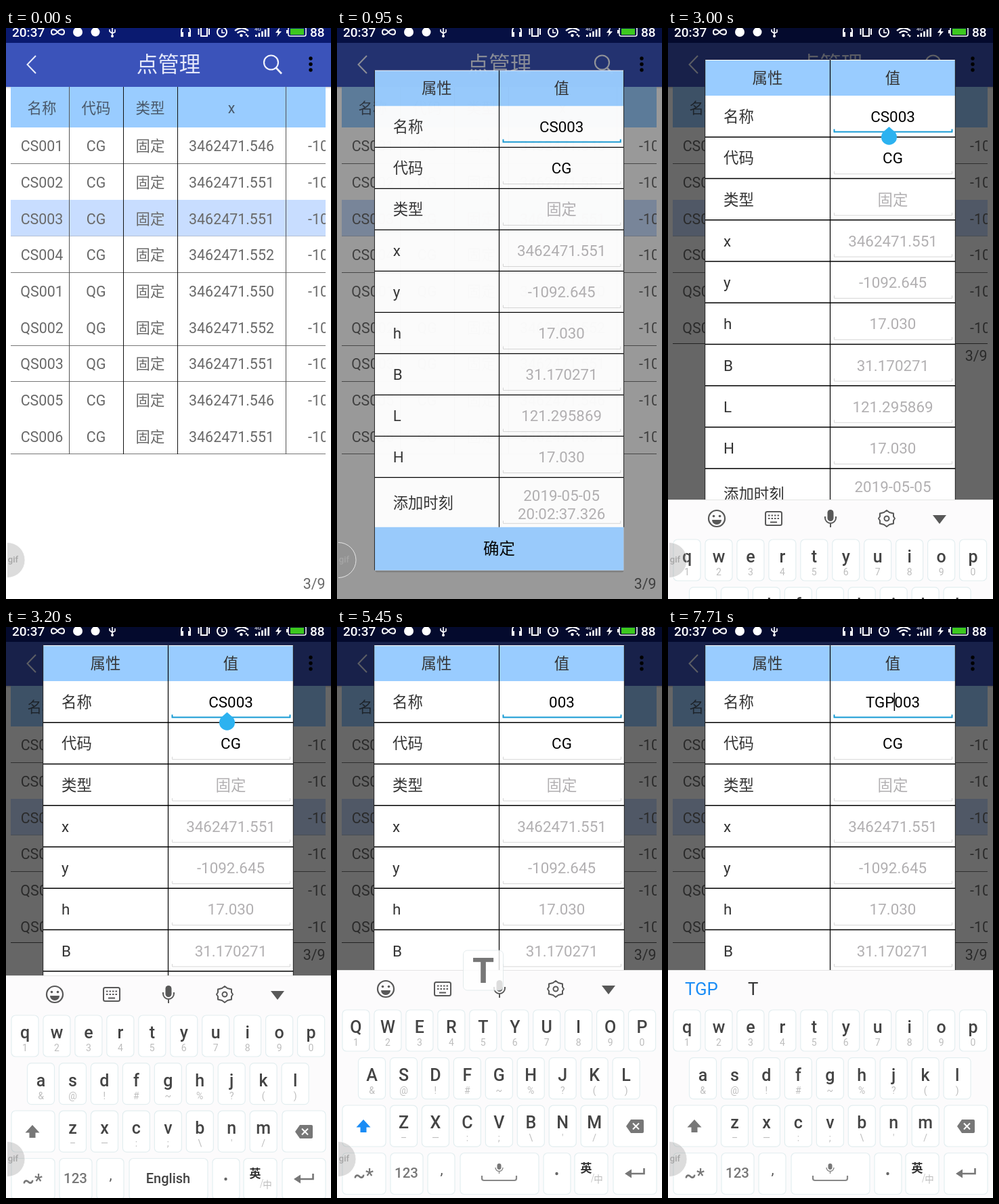
Recreate the animation shown at these times as an HTML page. Size 480 by 844 pixels, loop 8 s.

```html
<!DOCTYPE html>
<html lang="zh">
<head>
<meta charset="utf-8">
<title>点管理</title>
<style>
html, body { margin: 0; width: 100%; height: 100%; overflow: hidden; background: #fff; }
svg { display: block; width: 100%; height: 100%; }
text { font-family: Roboto, "Noto Sans CJK SC", "Noto Sans CJK", sans-serif; white-space: pre; }
</style>
</head>
<body>
<svg id="stage" viewBox="0 0 480 844"></svg>
<script>
const LOOP = 8000;
const BLUE = '#99ccff';
const stage = document.getElementById('stage');
const $ = id => document.getElementById(id);

// y is the optical middle of a line of capitals
const text = (s, x, y, size, fill, more = '') =>
  `<text x="${x}" y="${y + size * 0.36}" font-size="${size}" fill="${fill}" text-anchor="middle" ${more}>${s}</text>`;
const rect = (x, y, w, h, fill, more = '') =>
  `<rect x="${x}" y="${y}" width="${w}" height="${h}" fill="${fill}" ${more}/>`;
const path = (d, stroke, width, more = '') =>
  `<path d="${d}" fill="none" stroke="${stroke}" stroke-width="${width}" ${more}/>`;
const shape = (d, fill) => `<path d="${d}" fill="${fill}"/>`;
const dot = (x, y, r, fill) => `<circle cx="${x}" cy="${y}" r="${r}" fill="${fill}"/>`;
const ring = (x, y, r, stroke, width) =>
  `<circle cx="${x}" cy="${y}" r="${r}" fill="none" stroke="${stroke}" stroke-width="${width}"/>`;
const START = 'style="text-anchor:start"';

function appBar() {
  return rect(0, 0, 480, 22, '#0a1a70') +
    rect(0, 87, 480, 2, '#000', 'opacity=".12"') +
    rect(0, 22, 480, 65, '#3b53ba') +
    path('M44 41L31.5 54L44 67', '#e8ebfa', 2) +
    text('点管理', 240, 54, 31.5, '#e4e8fa') +
    ring(391.5, 51, 10.5, '#f0f2fc', 2.2) + path('M399 59L407 67.5', '#f0f2fc', 2.6) +
    [45, 53.5, 62].map(y => dot(450, y, 2.7, '#000')).join('');
}

function table() {
  const size = 21.4, grey = '#696969';
  const cols = [53, 133, 213, 333];
  const names = ['CS001', 'CS002', 'CS003', 'CS004', 'QS001', 'QS002', 'QS003', 'CS005', 'CS006'];
  const tails = ['546', '551', '551', '552', '550', '552', '551', '546', '551'];
  let out = rect(7, 87, 465, 60, BLUE) + rect(7, 254, 465, 54, '#c8ddff');
  ['名称', '代码', '类型', 'x'].forEach((s, i) => out += text(s, cols[i], 118, size, '#49586a'));
  names.forEach((name, i) => {
    const y = 174.5 + i * 53.67;
    [name, name[0] + 'G', '固定', '3462471.' + tails[i]]
      .forEach((s, c) => out += text(s, cols[c], y, size, grey));
    out += text('-1092.645', 446, y, size, grey, START);
  });
  [200.5, 361.5, 469.5, 522.5, 629.5].forEach(y => out += path(`M7 ${y}H472`, '#777', 1));
  out += path('M7 307.5H472', '#b4c0d4', 1);
  [93.5, 173.5, 253.5, 413.5].forEach((x, i) =>
    out += path(`M${x} 87V630`, i % 3 ? '#111' : '#555', 1));
  return out;
}

function dialog() {
  const rows = [['名称', ''], ['代码', 'CG'], ['类型', '固定'], ['x', '3462471.551'], ['y', '-1092.645'],
    ['h', '17.030'], ['B', '31.170271'], ['L', '121.295869'], ['H', '17.030']];
  const size = 22.4, grey = '#b2b0b2';
  const under = (y, color, w) => path(`M245.5 ${y - 4}V${y}H419.5V${y - 4}`, color, w);
  let out = rect(56, 64, 368, 742, '#000', 'opacity=".16" rx="2"') +
    rect(55, 61, 369, 742, '#fff') + rect(55, 62, 369, 52, BLUE) + rect(55, 739, 369, 64, BLUE) +
    text('属性', 147, 88, size, '#333') + text('值', 332, 88, size, '#333');
  rows.forEach(([label, value], i) => {
    const y = 145 + i * 61.25;
    out += text(label, 82, y, size, '#333', START) +
      text(value, 332, y, size, i < 2 ? '#000' : grey, i ? '' : 'id="name"') +
      (i ? under(y + 23.5, '#d6d6d6', 1) : under(167.5, '#169ad4', 2)) +
      path(`M55 ${y + 30.3}H424`, '#000', 1.4);
  });
  out += text('添加时刻', 82, 703, size, '#333', START) +
    text('2019-05-05', 332, 692, size, grey) + text('20:02:37.326', 332, 719, size, grey) +
    under(733.5, '#d6d6d6', 1) + path('M239.5 61V739', '#000', 1.2) +
    path('M54.7 61V803M424.3 61V739', '#222', 1) + text('确定', 239.5, 771, 23.5, '#000') +
    rect(0, 131, 1.5, 27, '#000', 'id="caret"') +
    '<path id="handle" d="M326.500 160L334.500 167A11.500 11.500 0 1 1 318.500 167Z" fill="#2cb2f0"/>';
  return out;
}

function toolbar() {
  const c = '#585858';
  let out = ring(72, 535, 12, c, 2.2) + dot(67.5, 531.5, 1.8, c) + dot(76.5, 531.5, 1.8, c) +
    shape('M65 537H79A7 7 0 0 1 65 537Z', c) +
    `<rect x="144" y="525" width="24" height="20" rx="2.500" fill="none" stroke="${c}" stroke-width="2"/>` +
    path('M148 530.5H165M148 535H165', c, 2, 'stroke-dasharray="2.500 2"') + path('M151 540.5H161', c, 2) +
    rect(235.5, 522, 9, 17, c, 'rx="4.500"') + path('M232 532V534A8 8 0 0 0 248 534V532M240 542V548', c, 2) +
    path('M323 523L327 526L333 527.500V532L335 535L333 538V542.500L327 544L323 547L319 544L313 542.500V538L311 535L313 532V527.500L319 526Z', c, 2, 'stroke-linejoin="round"') +
    ring(323, 535, 3.5, c, 2) + shape('M391 530H411L401 543Z', c);
  return `<g id="tools">${out}</g>`;
}

function keyboard() {
  const key = (x, y, w, id = '') =>
    rect(x, y, w, 61, '#fff', `rx="6" stroke="#e3eef0" stroke-width="1.200" ${id && `id="${id}"`}`);
  const rows = [['qwertyuiop', '1234567890', 28], ['asdfghjkl', '&@!#~%?()', 51.5], ['zxcvbnm', "–—:;\\'/", 98.5]];
  let out = rect(0, 507, 480, 345, '#fcfbfc') + path('M0 507.5H480', '#e4e4e4', 1) + toolbar() + '<g id="words"></g>';
  rows.forEach(([letters, subs, x0], r) => [...letters].forEach((ch, i) => {
    const x = x0 + i * 46.95, y = 566 + r * 70.6;
    out += key(x - 20, y, 40) + text(ch, x, y + 25, 25, '#444', 'class="letter" font-weight="500"') +
      text(subs[i].replace('&', '&amp;'), x, y + 48, 14, '#bdbdbd');
  }));
  out += key(8, 707, 64, 'shiftKey') + '<path id="shift" d="M39 728L49.500 739.500H43.500V747H34.500V739.500H28.500Z"/>' +
    key(408, 707, 64, 'backKey') +
    shape('M434 728H451Q453 728 453 730V746Q453 748 451 748H434L427 738Z', '#777') +
    path('M437 733.500L446 742.500M446 733.500L437 742.500', '#fff', 2);
  [[8, 64], [79, 48], [134, 40], [182, 116], [305, 40], [351, 49], [408, 64]].forEach(([x, w]) => out += key(x, 777.5, w));
  out += text('~*', 39, 810, 27, '#777', 'font-weight="500"') + text('123', 102.5, 807, 20.5, '#777', 'font-weight="500"') +
    text(',', 154.5, 801, 21, '#555') + dot(324.5, 808, 2.2, '#666') +
    text('英', 368, 800, 17, '#333', 'font-weight="700"') + path('M379.5 808L375.5 821', '#ccc', 1) + text('中', 386, 816, 13.5, '#bbb') +
    path('M453.5 800V808H431', '#777', 2.6) + shape('M425 808L435 801.5V814.5Z', '#777') +
    `<g id="english">${text('English', 239.5, 807, 20, '#444', 'font-weight="500"')}</g><g id="voice">` +
    rect(236.500, 793, 6, 9, '#777', 'rx="3"') + path('M234 799A5.500 5.500 0 0 0 245 799M239.5 804.5V808', '#888', 1.4) +
    path('M214 811V815Q214 818 217 818H262Q265 818 265 815V811', '#888', 2.2) + '</g>';
  return out;
}

function statusBar() {
  const w = '#fff';
  let out = text('20:37', 9, 6.2, 19, w, START + ' font-weight="500"') + text('88', 449, 6.2, 19, w, START + ' font-weight="500"') +
    path('M76 6C72 1 67 1 67 6S72 11 76 6S86 1 86 6S80 11 76 6', w, 2) +
    dot(106, 6, 7, w) + dot(132, 6, 6.5, w) +
    path('M157 -2V11M153 2V5L157 8L161 6V2', w, 1.6) + dot(157, 12, 2, w) +
    path('M259 9V4A6.500 6.500 0 0 1 272 4V9', w, 2) + rect(258, 6, 4, 7, w) + rect(269, 6, 4, 7, w) +
    path('M288 -2H297V12H288ZM284.500 1V10M300 1V10', w, 2) +
    ring(319, 6, 7, w, 2) + path('M319 2V7H323', w, 1.6) +
    path('M338 4Q348 -4 358 4M341.500 7.500Q348 2 354 7', w, 2.2) + dot(347.5, 11, 2.2, w) +
    '<path id="up" d="M353 11L355 8L357 11Z" fill="#fff"/><path id="down" d="M355 11H359L357 14Z" fill="#fff"/>' +
    text('4G', 372, 1, 8, w);
  for (let i = 0; i < 5; i++) out += rect(368 + i * 4.6, 10 - i * 2.6, 2.6, 3 + i * 2.6, w);
  return out + shape('M404 -1L398 7H402L400 13L407 5H403Z', w) +
    rect(417, -1, 26, 13, 'none', 'rx="2.500" stroke="#fff" stroke-width="1.500"') +
    rect(414, 3, 3, 5, w) + rect(420, 1, 20, 9, '#3cc81e');
}

stage.innerHTML = `<defs>
  <clipPath id="tableClip"><rect id="tableBox" x="7" y="87" width="465" height="700"/></clipPath>
  <clipPath id="wordClip"><rect x="0" y="507" width="400" height="60"/></clipPath>
  <clipPath id="bubbleClip"><rect x="2" y="750" width="40" height="80"/></clipPath></defs>
  ${rect(0, 0, 480, 844, '#fff')}${appBar()}
  <g clip-path="url(#tableClip)">${table()}</g>
  <path id="tableEnd" d="M7 466.500H472" stroke="#555"/>
  ${text('3/9', 471.5, 821, 21.4, '#696969', 'id="count" style="text-anchor:end"')}
  ${rect(0, 0, 480, 844, '#000', 'id="dim"')}
  <g id="dialog">${dialog()}</g>
  <g id="keyboard">${keyboard()}</g>
  <g id="popup">${rect(-29.5, 0, 59, 59, '#fff', 'rx="6" opacity=".8" stroke="#dde6e8"')}
    ${text('', 0, 29.5, 52, '#777', 'id="popText" font-weight="700"')}</g>
  ${statusBar()}
  <g clip-path="url(#bubbleClip)"><circle cx="2" cy="786.500" r="26" fill="#808080" fill-opacity=".28" stroke="#fff" stroke-opacity=".75"/>
    ${text('gif', 10.5, 785.5, 13, '#a6a6a6', 'font-weight="500"')}</g>`;

const letters = [...document.querySelectorAll('.letter')];
const show = (id, on) => $(id).style.display = on ? '' : 'none';
const put = (id, s) => { if ($(id).textContent !== s) $(id).textContent = s; };
const within = (t, ...spans) => spans.some(([a, b]) => t >= a && t < b);
// value of the last [time, value] pair already reached
const at = (t, steps) => steps.reduce((v, [from, next]) => t >= from ? next : v, steps[0][1]);

const WORDS = {
  T: [['T', 25], ['The', 94], ['To', 180], ['This', 264], ['That', 355]],
  TG: [['TG', 25], ['TGV', 94], ['TGE', 180], ['TGIF', 264], ['TGb', 355]],
  TGP: [['TGP', 25], ['T', 118]]
};
let shownWords = '';

function setWords(prefix) {
  if (prefix === shownWords) return;
  shownWords = prefix;
  const list = WORDS[prefix] || [];
  let out = '<g clip-path="url(#wordClip)">' + list.map(([s, x], i) =>
    text(s, x, 535, 25.8, i ? '#333' : '#1a8cf5', START)).join('') + '</g>';
  if (list.length > 2)
    out += path('M406 515V555', '#e2d8e4', 1) + path('M433 527L441 535L433 543M443 527L451 535L443 543', '#222', 2.4);
  $('words').innerHTML = out;
}

function draw(t) {
  const resized = t >= 3000;
  const typed = at(t, [[0, ''], [5600, 'T'], [6130, 'TG'], [6550, 'TGP']]);
  const kept = at(t, [[0, 'CS'], [3780, 'C'], [3980, '']]);

  $('tableBox').setAttribute('height', resized ? 379 : 700);
  show('tableEnd', resized);
  $('count').setAttribute('y', (resized ? 484 : 821) + 7.7);

  $('dim').setAttribute('opacity', at(t, [[0, 0], [860, 0.12], [950, 0.4], [1050, 0.6]]));
  show('dialog', t >= 860);
  const scale = at(t, [[0, 0.984], [950, 0.996], [1050, 1]]);
  const lift = at(t, [[0, 0], [3000, -14], [3100, -34]]);
  $('dialog').setAttribute('opacity', at(t, [[0, 0.85], [950, 0.97], [1050, 1]]));
  $('dialog').setAttribute('transform', `translate(239.5 ${432 + lift}) scale(${scale}) translate(-239.5 -432)`);

  put('name', kept + typed + '003');
  const caretOn = within(t, [860, 950], [1250, 1740], [2210, 3000], [3490, 3900], [4540, 5270], [5600, 6050], [6550, 7140], [7710, 8000]);
  show('caret', caretOn);
  if (caretOn) {
    const index = t < 2440 ? 0 : (kept + typed).length;
    $('caret').setAttribute('x', $('name').getStartPositionOfChar(index).x - 0.7);
  }
  show('handle', within(t, [2440, 3780]));

  show('keyboard', resized);
  const slide = at(t, [[0, 190], [3100, 60], [3200, 8], [3290, 0]]);
  $('keyboard').setAttribute('transform', `translate(0 ${slide})`);
  const label = at(t, [[0, 1], [3780, 0.75], [3850, 0.5], [3920, 0.25], [3980, 0.1], [4050, 0]]);
  $('english').setAttribute('opacity', label);
  $('voice').setAttribute('opacity', 1 - label);
  $('backKey').setAttribute('fill', within(t, [3780, 3850], [3920, 4050]) ? '#e4e4e4' : '#fff');
  $('shiftKey').setAttribute('fill', within(t, [4880, 4910]) ? '#e4e4e4' : '#fff');

  const caps = within(t, [4880, 5600], [5850, 6130], [6300, 6550]);
  $('shift').setAttribute('fill', caps ? '#1a8cf5' : '#777');
  letters.forEach(el => {
    const ch = el.textContent, want = caps ? ch.toUpperCase() : ch.toLowerCase();
    if (ch !== want) el.textContent = want;
  });
  show('tools', !typed);
  setWords(typed);

  const [ch, x, y] = at(t, [[0, ['']], [5450, ['T', 216, 478]], [5760, ['']],
    [6050, ['G', 239.5, 548]], [6300, ['']], [6460, ['P', 444.5, 478]], [6700, ['']]]);
  show('popup', ch);
  if (ch) {
    put('popText', ch);
    $('popup').setAttribute('transform', `translate(${x} ${y})`);
  }

  const busy = within(t, [2030, 3000], [4630, 5450], [6460, 8000]);
  show('up', !busy);
  show('down', true);
}

const start = performance.now();
function tick() {
  draw((performance.now() - start) % LOOP);
  requestAnimationFrame(tick);
}
tick();
</script>
</body>
</html>
```
